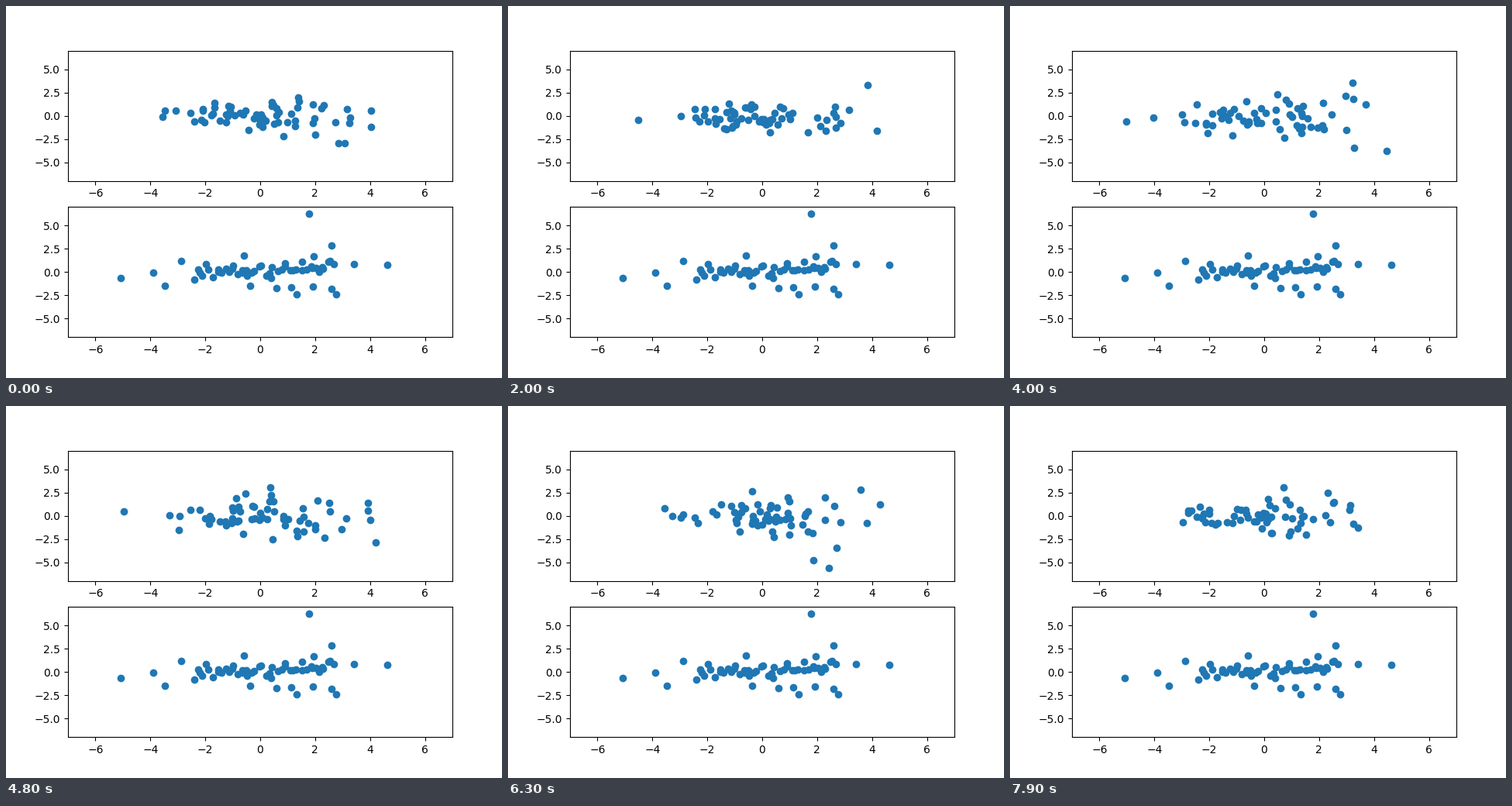
A matplotlib script for the animation above (8000 ms loop, 640 by 480 pixels).

```python
import numpy as np
import matplotlib.pyplot as plt
from matplotlib.animation import FuncAnimation

FRAMES, INTERVAL = 80, 100
LIMIT = 7
COUNT = 63

# Dots that stand clear of the fixed cloud's dense core
OUTLIERS = [
    (-5.07, -0.65), (-3.89, -0.05), (-3.46, -1.5), (-2.87, 1.2),
    (-0.58, 1.77), (-0.36, -1.5), (0.6, -1.75), (1.14, -1.65),
    (1.34, -2.4), (1.78, 6.25), (1.93, -1.57), (1.96, 1.68),
    (2.6, 2.85), (2.61, -1.83), (2.77, -2.4), (2.53, 1.18),
    (3.42, 0.85), (4.63, 0.77),
]


def fixed_cloud():
    """Outliers plus a gently rising band of jittered dots."""
    rng = np.random.default_rng(7)
    n = COUNT - len(OUTLIERS)
    x = np.linspace(-2.4, 2.6, n) + rng.normal(0, 0.06, n)
    y = 0.2 + 0.14 * x + rng.normal(0, 0.45, n)
    return np.vstack([OUTLIERS, np.column_stack([x, y])])


def sample(i):
    """Fresh cloud for each step; the spread of y grows with x."""
    rng = np.random.default_rng(100 + i)
    x = rng.normal(0, 1.8, COUNT)
    return np.column_stack([x, rng.normal(0, np.exp(x / 5))])


fig, (top, bottom) = plt.subplots(2, 1, figsize=(6.4, 4.8), dpi=100)
for ax in (top, bottom):
    ax.set(xlim=(-LIMIT, LIMIT), ylim=(-LIMIT, LIMIT))

cloud = top.scatter(*sample(0).T, color="C0")
bottom.scatter(*fixed_cloud().T, color="C0")


def update(i):
    cloud.set_offsets(sample(i))
    return (cloud,)


anim = FuncAnimation(fig, update, frames=FRAMES, interval=INTERVAL,
                     repeat=True, repeat_delay=0)
plt.show()
```
